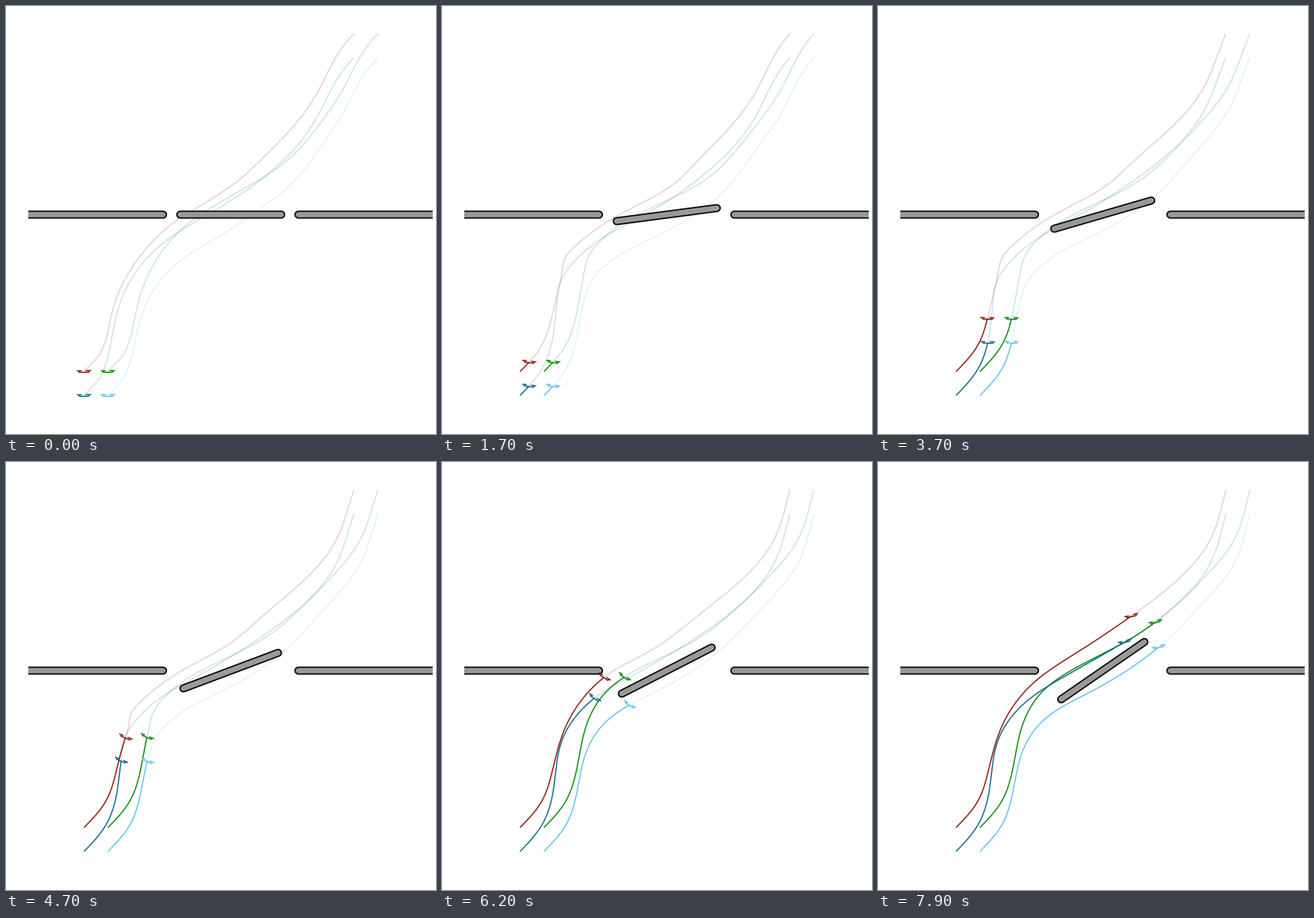
Animation of 521x518 px, one loop 8 s. Source, as a matplotlib script:

```python
import numpy as np
import matplotlib.pyplot as plt
from matplotlib.animation import FuncAnimation
from matplotlib.patches import Rectangle

plt.rcParams["path.snap"] = False

W, H, DPI = 521, 518, 100
FRAMES, STEP = 80, 100
PT = 72 / DPI
FLOOR, DOOR_X, DOOR_HALF, DOOR_SPEED = 252.5, 272.3, 61.2, 4.375

START, GOAL, GAP = np.array([94.5, 442.5]), np.array([421.5, 33.5]), 29
CLIMB = START[1] - GOAL[1]
TAKEOFF = np.array([(0, 0), (27, -33), (40, -72)])
ARRIVAL = np.array([(-51, 102), (-22, 66), (0, 0)])
ACCEL, REPLAN, END = 11.1, 1.7, 7.9


def bell(x, mid, width):
    return np.exp(-((x - mid) / width) ** 2)


def smooth(u):
    u = np.clip(u, 0, 1)
    return u * u * (3 - 2 * u)


def natural_spline(points, count=600):
    """Natural cubic spline through the points, parametrised by chord length."""
    p = np.asarray(points, float)
    h = np.hypot(*np.diff(p, axis=0).T)
    knots = np.concatenate([[0], np.cumsum(h)])
    a, rhs = np.eye(len(p)), np.zeros_like(p)
    for k in range(1, len(p) - 1):
        a[k, k - 1:k + 2] = h[k - 1], 2 * (h[k - 1] + h[k]), h[k]
        rhs[k] = 6 * ((p[k + 1] - p[k]) / h[k] - (p[k] - p[k - 1]) / h[k - 1])
    m = np.linalg.solve(a, rhs)
    t = np.linspace(0, knots[-1], count)
    i = np.clip(np.searchsorted(knots, t) - 1, 0, len(h) - 1)
    w = h[i][:, None]
    u = (t - knots[i])[:, None] / w
    v = 1 - u
    return (v * p[i] + u * p[i + 1]
            + w * w / 6 * ((v ** 3 - v) * m[i] + (u ** 3 - u) * m[i + 1]))


def tilt(t):
    """Lean in radians, clockwise: setting off, rounding the gap, levelling out."""
    return np.radians(8 * bell(t, 1.6, .6) + 46 * bell(t, 5.6, 1.1)
                      - 14 * smooth(t - 6.8))


def stroke(ax, color, width, **kw):
    kw.setdefault("solid_capstyle", "butt")
    return ax.plot([], [], color=color, lw=width * PT, **kw)[0]


class Beam:
    """Grey bar with round ends and a black outline."""

    def __init__(self, ax, clip=None):
        self.lines = [stroke(ax, c, w, solid_capstyle="round", zorder=5)
                      for c, w in (("black", 9.8), ("#999999", 6.6))]
        if clip:
            for line in self.lines:
                line.set_clip_path(clip)

    def place(self, x, y):
        for line in self.lines:
            line.set_data(x, y)


class Drone:
    # Two rotors, then stems and body
    PARTS = np.array([(-8.7, -1), (-3, -1), (np.nan, np.nan),
                      (2.2, -1.2), (8.7, -1.2), (np.nan, np.nan),
                      (-5.8, -1), (-5.8, .8), (5.8, .8), (5.8, -1)]).T

    def __init__(self, ax, color, col, row, middle, early, late):
        slot = GAP * np.array([col, row])
        self.xy = natural_spline([*(START + slot + TAKEOFF), *middle,
                                  *(GOAL + slot + ARRIVAL)])
        steps = np.hypot(*np.diff(self.xy, axis=0).T)
        self.dist = np.concatenate([[0], np.cumsum(steps)])
        self.floor = START[1] + slot[1]
        self.early, self.late = early, late
        self.plan = stroke(ax, color, 1.4, alpha=.2)
        self.trail = stroke(ax, color, 1.4, zorder=3)
        self.body = stroke(ax, color, 1.4, zorder=6)

    def deviation(self, c, t):
        """Sideways error of the plan at climb c, shrinking as time goes on."""
        hump = bell(c, 220, 34)
        u = np.clip((c - 230) / (CLIMB - 230), 0, 1)
        tail = -17 * 6.75 * u * u * (1 - u)
        wave = -6 * np.sin(2 * np.pi * np.clip((c - 20) / 200, 0, 1))
        bend = self.late * (hump - .5 * bell(c, 140, 22))
        if t < REPLAN:
            k = t / REPLAN
            return (1 - k) * (wave + self.early * hump + 1.15 * tail) + k * (bend + tail)
        k = (t - REPLAN) / (END - REPLAN)
        return (1 - k * k) * bend + (1 - k) ** 3 * tail

    def update(self, t):
        gone = ACCEL * t * t / 2
        here = np.array([np.interp(gone, self.dist, axis) for axis in self.xy.T])
        cut = np.searchsorted(self.dist, gone)
        self.trail.set_data(*np.vstack([self.xy[:cut], here]).T)

        x, y = np.vstack([here, self.xy[cut:]]).T
        ease = smooth((here[1] - y) / 28)
        self.plan.set_data(x + ease * self.deviation(self.floor - y, t), y)

        c, s = np.cos(tilt(t)), np.sin(tilt(t))
        self.body.set_data(*(here[:, None] + np.array([[c, -s], [s, c]]) @ self.PARTS))


fig = plt.figure(figsize=(W / DPI, H / DPI), dpi=DPI, facecolor="white")
ax = fig.add_axes([0, 0, 1, 1])
ax.set(xlim=(0, W), ylim=(H, 0))
ax.axis("off")

room = Rectangle((27, 0), 490, H, fc="none", ec="none")
ax.add_patch(room)
for ends in ((0, 190.3), (354.2, 550)):
    Beam(ax, room).place(ends, (FLOOR, FLOOR))
door = Beam(ax)

drones = [
    Drone(ax, "#8b1a10", 0, 0,
          [(150, 320), (185.5, 270), (242, 230), (302, 190)], 12, 17),
    Drone(ax, "#0a8a0a", 1, 0,
          [(174.5, 320), (194.5, 283), (234.5, 252), (309.5, 212)], -6, 8),
    Drone(ax, "#106a85", 0, 1,
          [(145, 338), (169.5, 299.5), (227, 259), (308, 212)], 5, 7),
    Drone(ax, "#66c2ee", 1, 1,
          [(175.5, 349), (195.5, 317.5), (255, 279.5), (343.5, 221)], -5, 5),
]


def draw(i):
    t = i * STEP / 1000
    a = np.radians(DOOR_SPEED * t)
    dx, dy = DOOR_HALF * np.cos(a), DOOR_HALF * np.sin(a)
    door.place([DOOR_X - dx, DOOR_X + dx], [FLOOR + dy, FLOOR - dy])
    for drone in drones:
        drone.update(t)
    return []


anim = FuncAnimation(fig, draw, frames=FRAMES, interval=STEP,
                     init_func=lambda: draw(0), repeat=True, blit=False)
plt.show()
```
